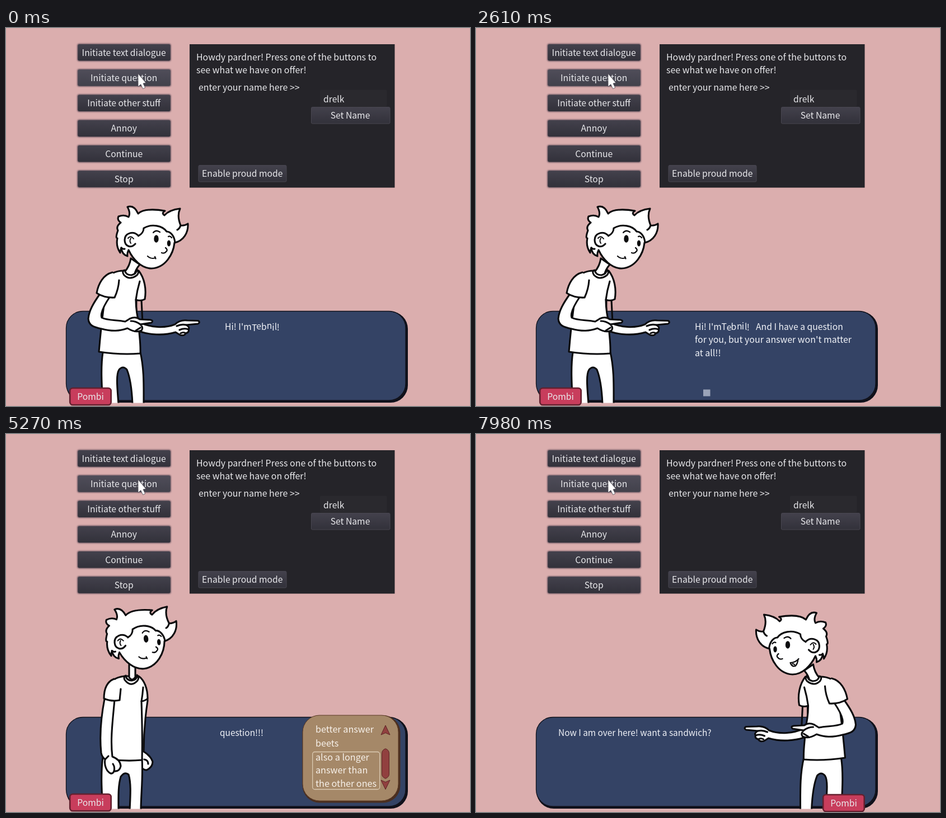
Write an HTML page that moves like this. It is 829 by 676 pixels and loops after 8000 ms.

```html
<!DOCTYPE html>
<html lang="en">
<head>
<meta charset="utf-8">
<title>Dialogue demo</title>
<style>
html, body { margin: 0; width: 100%; height: 100%; overflow: hidden; background: #dbaeae; }
svg { display: block; width: 829px; height: 676px; }
text { font: 15.7px "Noto Sans CJK JP", "Noto Sans CJK SC", "Noto Sans CJK", sans-serif; fill: #e9e9ec; white-space: pre; }
.mid { text-anchor: middle; }
.panel, .wide { font-size: 15.95px; }
.tight { font-size: 15.4px; }
#halo { filter: blur(.8px); }
#guy { fill: #fff; stroke: #0b0b0d; stroke-width: 3.1; stroke-linecap: round; stroke-linejoin: round; }
#guy .line { fill: none; }
#guy .ink { fill: #0b0b0d; stroke: none; }
#speech text { fill: #f1f3f8; }
#choices text { font-size: 16.2px; fill: #f7f1ea; }
#choices .red { fill: #91403f; stroke: #5c2325; stroke-width: 1; stroke-linejoin: round; }
</style>
</head>
<body>
<svg viewBox="0 0 829 676">
  <defs>
    <linearGradient id="face" x2="0" y2="1"><stop stop-color="#43414c"/><stop offset="1" stop-color="#32313a"/></linearGradient>
    <linearGradient id="hover" x2="0" y2="1"><stop stop-color="#4f4d59"/><stop offset="1" stop-color="#42414b"/></linearGradient>
    <clipPath id="floor"><rect y="290" width="829" height="380.5"/></clipPath>
    <clipPath id="view"><rect x="540" y="519" width="132" height="119"/></clipPath>
  </defs>
  <rect width="829" height="676" fill="#dbaeae"/>

  <g id="halo"></g>
  <g id="menu"></g>

  <rect x="328" y="29" width="366.5" height="256.5" fill="#252429"/>
  <text class="panel" x="340" y="58">Howdy pardner! Press one of the buttons to</text>
  <text class="panel" x="340" y="81.3">see what we have on offer!</text>
  <text class="panel" x="344" y="111.8">enter your name here &gt;&gt;</text>
  <rect x="561" y="110.5" width="119.5" height="30" rx="2" fill="#2a292e"/>
  <text x="567" y="132.5">drelk</text>
  <g fill="url(#face)" stroke="#484650">
    <rect x="545.5" y="141.5" width="140.5" height="29.5" rx="2"/>
    <rect x="344" y="245.5" width="157" height="29.5" rx="2"/>
  </g>
  <text class="mid" x="615" y="162.2">Set Name</text>
  <text class="mid" x="422.3" y="266">Enable proud mode</text>

  <path d="M236 81.500V105l4.800-4.300 3.700 8 4.200-2-3.700-7.600 5-.8Z" fill="#fff" stroke="#4a4450" stroke-width=".8"/>

  <rect x="108" y="507" width="610" height="163" rx="31" fill="#10111b"/>
  <rect x="107.500" y="506.500" width="606.500" height="159.500" rx="30" fill="#344365" stroke="#12131c" stroke-width="1.300"/>

  <g id="speech"></g>
  <rect id="marker" x="406" y="646.500" width="12.500" height="12" fill="#9aa3b8"/>

  <g clip-path="url(#floor)">
    <g id="guy">
      <g id="pointing">
        <path d="M173 580C169 605 171 640 173 673H201C199 645 196 620 202 611Q209 603 216 611C223 628 225 650 226 673H246C246 640 247 610 240 580Z"/>
        <path d="M233 485C233 500 231 515 240 527C258 535 282 538 302 530C308 524 316 522 324 523L343 523.500Q348 526 343 529L322 531Q329 535 326 539Q328 544 321 546Q319 551 311 549L303 544C280 551 255 548 240 543L228 530Z"/>
        <path class="line" d="M305 533Q313 529 322 531M310 540Q318 536 326 539M312 546Q317 543 321 546M242 487Q243 508 244 528"/>
        <path d="M211 434C196 434 182 440 176 453L178 478C172 510 169 545 166 579Q205 585 240 582C241 562 237 545 237 525C233 510 232 500 232 486Q241 489 248 485C251 468 248 448 237 434Z"/>
        <path class="line" d="M239 453Q234 470 232 486"/>
        <path d="M169 474C156 492 148 506 147 520C148 532 156 535 171 538C190 543 203 542 217 537Q232 546 242 541Q246 536 240 530L260 527Q264 523 258 522L239 521Q231 515 221 520L213 525C197 522 180 523 171 518Q167 508 186 480Z"/>
        <path class="line" d="M223 524Q232 524 240 530M232 541L240 536"/>
        <path d="M190 437C174 441 165 457 162 474Q176 483 194 482Q201 467 202 451"/>
        <path d="M223 412Q221 426 212 436Q218 446 229 443Q231 432 239 423Z"/>
        <path d="M212 433Q206 435 211 442Q221 452 234 442Q239 436 234 432Q233 440 224 442Q214 442 212 433Z"/>
      </g>
      <g id="standing">
        <path d="M246 450C252 462 253 470 253 477C248 510 246 540 246 568Q258 575 262 586Q262 596 251 601Q244 601 241 593L236 560V470Z"/>
        <path class="line" d="M247 582Q254 583 254 590"/>
        <path d="M173 578C169 605 171 640 173 673H201C201 650 200 630 205 613Q212 603 219 609C224 625 222 650 221 673H241C241 645 245 615 243 580Z"/>
        <path d="M212 433C195 435 188 440 185 455L183 581Q212 586 243 583C244 545 243 510 242 478Q249 477 253 473C253 455 247 440 237 433Z"/>
        <path class="line" d="M245 453Q244 467 242 478"/>
        <path d="M176 474C170 505 167 540 170 570Q171 577 177 582C175 593 180 604 187 607Q191 608 193 603Q203 604 205 594Q204 582 190 577C186 545 191 510 194 475Z"/>
        <path class="line" d="M191 590Q195 596 193 603M177 582L183 576"/>
        <path d="M193 438C178 444 175 460 175 473Q188 479 203 476L205 456"/>
        <path d="M220 412V435Q225 443 231 435V412Z"/>
        <path d="M214 432Q208 436 214 442Q224 453 235 441Q239 435 234 431Q234 440 225 441Q215 441 214 432Z"/>
      </g>
      <g id="head">
        <path d="M217 408Q207 405 206 393Q204 398 204 402Q196 390 199 376Q195 376 200 362Q196 355 205 348Q198 343 201 337Q211 333 219 338Q223 331 217 320Q229 316 236 332Q248 321 284 327Q277 331 283 335Q292 325 311 323Q305 336 312 353Q319 354 325 350C326 366 317 381 301 384C299 404 285 429 260 430C242 430 227 414 219 397Q216 403 217 408Z"/>
        <path class="line" d="M236 372C243 369 246 363 246 358C261 349 280 354 287 364C294 364 301 372 302 384M206 393Q209 396 212 395M312 353Q310 359 306 361"/>
        <path d="M236 371C227 362 212 367 212 379C212 390 223 395 231 386"/>
        <path class="line" d="M218 376Q223 370 228 377M223 376Q220 381 223 385" stroke-width="2"/>
        <ellipse class="ink" cx="268.500" cy="377" rx="4.200" ry="6.800"/>
        <ellipse class="ink" cx="291" cy="385" rx="3.200" ry="5.600"/>
        <path class="line" d="M263 366Q268 360 275 365M290 373Q293 371 296 375" stroke-width="2.200"/>
        <path class="line" d="M285 393Q290 397 286 400Q283 404 278 402" stroke-width="2.300"/>
        <path id="shut" class="line" d="M253 408Q259 414 267 411M266 409L267.500 412.500" stroke-width="2.200"/>
        <g id="open" stroke-width="2.200">
          <path d="M249 402Q255 409 264 409Q261 417 255 415Q251 411 250 403Z"/>
          <path class="line" d="M255 415Q256 411 260 411"/>
        </g>
      </g>
    </g>
  </g>

  <g id="choices">
    <rect x="529.500" y="503" width="175" height="156.500" rx="31" fill="#4b2f20"/>
    <rect x="530" y="503" width="171" height="153" rx="30" fill="#a58868" stroke="#5a3925"/>
    <g clip-path="url(#view)">
      <g id="list"><rect id="pick" x="547.700" width="120" rx="4" fill="none" stroke="#dccbb4" stroke-width="1.300"/></g>
    </g>
    <path class="red" d="M678 521L686 538 678 534.500 670 538Z"/>
    <path class="red" d="M678 635.500L686 619 678 622.500 670 619Z"/>
    <path id="thumb" class="red" d="M678 541Q684 543 684.500 549V587Q684 592 678 594.500Q672 592 671.500 587V549Q672 543 678 541Z"/>
  </g>

  <g id="tag">
    <rect x="114.200" y="644" width="73.500" height="30" rx="5" fill="#c83d5c" stroke="#64202f" stroke-width="2.600"/>
    <text class="mid" x="151" y="665">Pombi</text>
  </g>
</svg>
<script>
const LOOP = 8000, RATE = 0.043;
const $ = id => document.getElementById(id);
const clamp = (v, lo = 0, hi = 1) => Math.min(hi, Math.max(lo, v));
const ramp = (t, from, to) => clamp((t - from) / (to - from));
const show = (el, on) => { el.style.display = on ? '' : 'none'; };

function add(parent, name, attrs, text = '') {
  const el = document.createElementNS('http://www.w3.org/2000/svg', name);
  for (const k in attrs) el.setAttribute(k, attrs[k]);
  el.textContent = text;
  return parent.appendChild(el);
}

['Initiate text dialogue', 'Initiate question', 'Initiate other stuff', 'Annoy', 'Continue', 'Stop'].forEach((label, i) => {
  const y = 28.7 + i * 45.25;
  add($('halo'), 'rect', { x: 127, y: y - 1, width: 168, height: 32, rx: 4, fill: '#77606a' });
  add($('menu'), 'rect', { x: 128.3, y: y + .3, width: 165.4, height: 29.4, rx: 3, fill: i === 1 ? 'url(#hover)' : 'url(#face)' });
  add($('menu'), 'text', { class: 'mid', x: 210.7, y: y + 21 }, label);
});

// Each line: x, baseline, text, text style; "shaky" marks the jittering name.
const line = (x, y, text, style, shaky) => {
  const el = add($('speech'), 'text', { x, y, class: style });
  const letters = shaky ? [...text].map(() => add(el, 'tspan', {})) : null;
  return { el, text, letters };
};
const intro = [
  line(391, 540, "Hi! I'm ", ''),
  line(439, 540, 'Tebnil!', '', true),
  line(493, 540, '  And I have a question ', ''),
  line(391, 563.3, "for you, but your answer won't matter ", 'wide'),
  line(391, 586.6, 'at all!!', 'wide')
];
const question = [line(382, 540, 'question!!!', 'tight')];
const moved = [line(147, 540, 'Now I am over here! want a sandwich?', 'tight')];

function type(lines, n, t) {
  for (const { el, text, letters } of lines) {
    const part = text.slice(0, Math.max(0, Math.floor(n + 1e-6)));
    if (letters) shake(letters, part, t);
    else if (el.textContent !== part) el.textContent = part;
    n -= text.length;
  }
}

function shake(letters, part, t) {
  let px = 0, py = 0;
  letters.forEach((el, i) => {
    const x = .7 * Math.sin(t / 90 + i * 3.1);
    const y = 2 * Math.sin(t / 110 + 1.5 + i * 2.2) * Math.cos(i * .9);
    el.textContent = part[i] || '';
    el.setAttribute('dx', x - px);
    el.setAttribute('dy', y - py);
    px = x; py = y;
  });
}

const items = [
  { y: 520, h: 24, rows: ['good answer'] },
  { y: 545, h: 24, rows: ['bad answer'] },
  { y: 570, h: 46, rows: ['a longer and', 'better answer'] },
  { y: 618, h: 24, rows: ['beets'] },
  { y: 643, h: 68, rows: ['also a longer', 'answer than', 'the other ones'] }
];
for (const { y, rows } of items)
  rows.forEach((row, i) => add($('list'), 'text', { x: 553, y: y + 16 + i * 23.3 }, row));
const pickTimes = [3880, 4180, 4410, 4870, 5270];

function drawChoices(t) {
  show($('choices'), t >= 3240 && t < 6740);
  const picked = pickTimes.filter(p => t >= p).length - 1;
  const item = items[picked];
  show($('pick'), !!item);
  let scroll = 0;
  if (item) {
    scroll = Math.max(0, item.y + item.h - 636);
    $('pick').setAttribute('y', item.y + .5);
    $('pick').setAttribute('height', item.h - 1);
  }
  $('list').setAttribute('transform', `translate(0 ${-scroll})`);
  $('thumb').setAttribute('transform', `translate(0 ${scroll * .29})`);
}

function drawGuy(t, talking) {
  const right = t >= 6870;
  const standing = (t >= 2680 && t < 2960) || (t >= 3630 && !right);
  const enter = ramp(t, 6870, 7070);
  const open = talking && Math.floor(t / 160) % 2 === 1;
  show($('pointing'), !standing);
  show($('standing'), standing);
  show($('open'), open);
  show($('shut'), !open);
  $('head').setAttribute('transform', standing ? 'translate(-18.5 -10) rotate(-5 260 375)' : '');
  $('guy').setAttribute('transform', right ? `translate(${825.5 + 124 * (1 - enter)} 0) scale(-1 1)` : '');
  $('guy').setAttribute('opacity', right ? enter : 1 - ramp(t, 6740, 6860));
  $('tag').setAttribute('transform', t >= 6740 ? 'translate(506 1)' : '');
}

function draw(t) {
  const first = t < 2680, last = t >= 6740;
  const introCount = 15 + Math.max(0, t - 120) * RATE;
  const askCount = (t - 2965) * RATE;
  const movedCount = t < 7490 ? Math.min(19, (t - 6780) * RATE) : 20 + (t - 7490) / 28;

  type(intro, first ? introCount : 0, t);
  type(question, !first && !last ? askCount : 0, t);
  type(moved, last ? movedCount : 0, t);
  show($('marker'), first && t >= 1800);

  const talking = (t > 120 && t < 1760) || (t > 2965 && t < 3170) || (t > 7070 && t < 7250) || t >= 7490;
  drawGuy(t, talking);
  drawChoices(t);
}

const start = performance.now();
function tick() {
  draw((performance.now() - start) % LOOP);
  requestAnimationFrame(tick);
}
tick();
</script>
</body>
</html>
```
